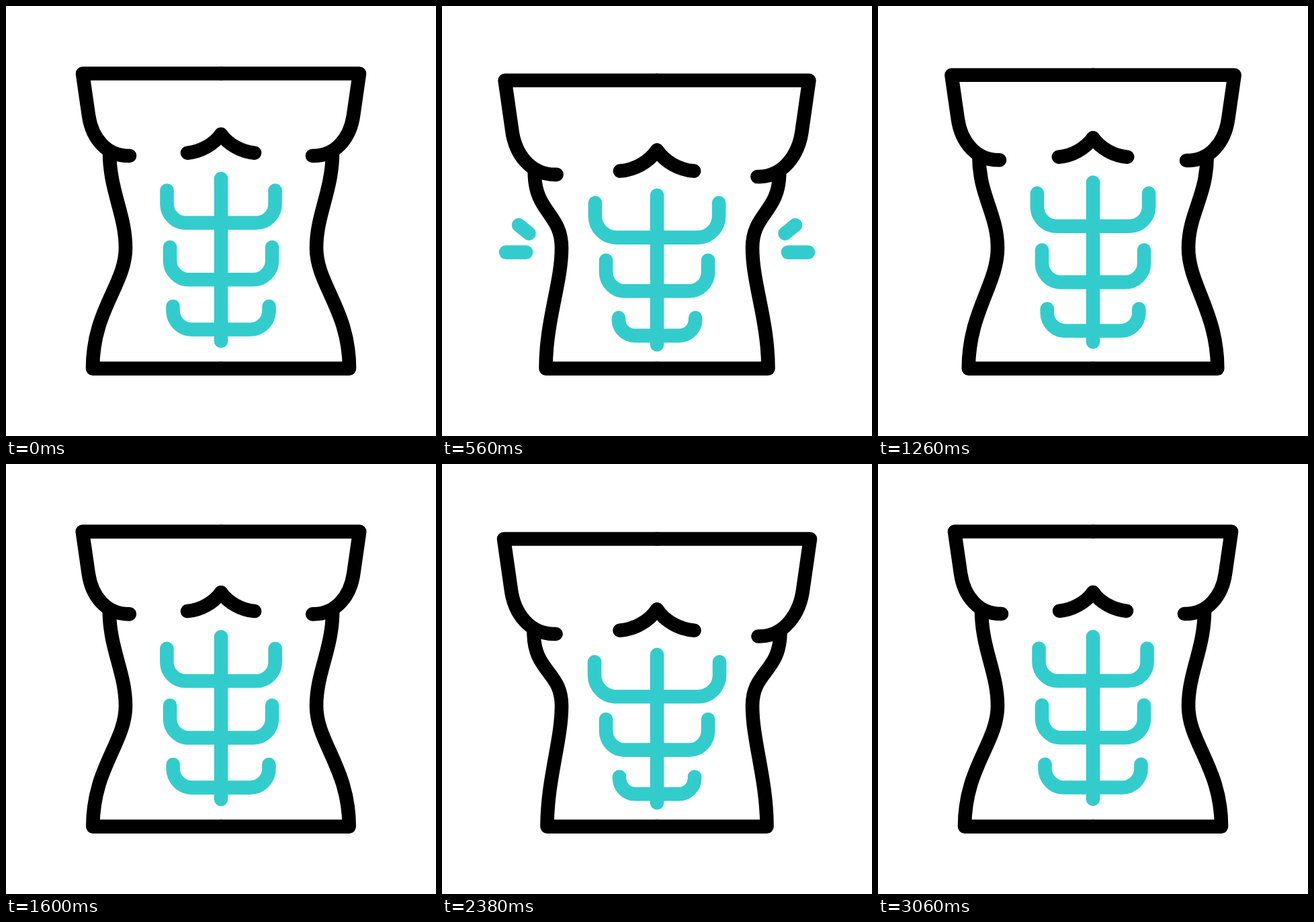
An HTML page for the animation above (3600 ms loop, 640 px wide and 640 px high).

```html
<!DOCTYPE html>
<html lang="en">
<head>
<meta charset="utf-8">
<title>Abs</title>
<style>
html, body { margin: 0; width: 100%; height: 100%; overflow: hidden; background: #fff; }
svg { display: block; width: 100%; height: 100%; }
path { fill: none; stroke-width: 20.6; stroke-linecap: round; stroke-linejoin: round; }
.ink { stroke: #000; }
.teal { stroke: #33cccc; }
</style>
</head>
<body>
<svg viewBox="0 0 640 640"></svg>
<script>
const LOOP = 3600, PERIOD = 1500, START = 60, MOVE = 690, RELAX = 810;
const svg = document.querySelector('svg');

const clamp = x => Math.min(1, Math.max(0, x));
const smooth = x => x * x * (3 - 2 * x);

// cubic-bezier(.333, 0, .35, 1), solved by bisection
function ease(x) {
  let lo = 0, hi = 1, s = 0.5;
  for (let i = 0; i < 24; i++) {
    s = (lo + hi) / 2;
    const u = 1 - s;
    if (u * u * s + 1.05 * u * s * s + s * s * s < x) lo = s; else hi = s;
  }
  return smooth(s);
}

function addPath(cls, mirrored) {
  const el = document.createElementNS('http://www.w3.org/2000/svg', 'path');
  el.setAttribute('class', cls);
  if (mirrored) el.setAttribute('transform', 'matrix(-1 0 0 1 640 0)');
  svg.append(el);
  return el;
}

// Blend two path strings that share the same commands
function blend(rest, flex, p) {
  const to = flex.match(/[\d.]+/g);
  let i = 0;
  return rest.replace(/[\d.]+/g, n => (+n + (to[i++] - n) * p).toFixed(2));
}

// Left half of one ab row: end x, end y, floor y, corner radius
function row(x, top, y, r) {
  const k = r * 0.45;
  return `M${x} ${top} L${x} ${y - r} C${x} ${y - k} ${x + k} ${y} ${x + r} ${y} L320 ${y}`;
}

const armL = ['M320 100.5 L114 100.5 L123 163 C128 197 150 224 184 223',
              'M320 111.5 L92 111.5 L102.5 185 C107 223 131 254 169.5 253'];
const armR = [armL[0],
              'M320 111.5 L92 111.5 L102.5 185 C107 223 131 257.5 169.5 256.5'];
const waist = ['M154 217 C154 275 178 310 178 360 C178 415 129 452 129 539.6 L320 539.6',
               'M136.5 250 C136.5 310 178 308 178 360 C178 412 156.5 470 156.5 539.6 L320 539.6'];
const chest = ['M270 218.7 C290 217 309 206 320 191',
               'M264.5 247.7 C287 246 308 234 320 216.5'];
const spine = ['M320 257 L320 498.8', 'M320 283.8 L320 504.3'];
const rows = [
  [row(239.5, 274.5, 322.8, 28), row(227, 294.5, 346.3, 32)],
  [row(244, 359, 407.3, 28), row(244, 380, 425.6, 28)],
  [row(248.5, 447, 481.5, 28), row(264, 465.5, 491.3, 23.5)]
];

const shapes = [];
function add(cls, pair, mirrored) {
  shapes.push({ el: addPath(cls, mirrored), pair });
}
add('ink', armL, false);
add('ink', armR, true);
for (const m of [false, true]) {
  add('ink', waist, m);
  add('ink', chest, m);
  for (const r of rows) add('teal', r, m);
}
add('teal', spine, false);

// Flex marks run from beside the waist outwards
const marks = [];
for (const m of [false, true])
  for (const line of [[134, 366.6, 90, 366.6], [134, 342.3, 111.5, 324]])
    marks.push({ el: addPath('teal', m), line });

function drawMarks(c) {
  const head = smooth(clamp((c - 272) / 290));
  const tail = smooth(clamp((c - 417) / 290));
  for (const { el, line: [x1, y1, x2, y2] } of marks) {
    const at = f => `${x1 + (x2 - x1) * f} ${y1 + (y2 - y1) * f}`;
    el.setAttribute('d', head > tail ? `M${at(tail)} L${at(head)}` : '');
  }
}

function draw(t) {
  const since = t - START;
  const c = since < 0 ? 0 : since < PERIOD ? since : since - PERIOD;
  // The second flex starts as the first one comes to rest
  const second = since >= PERIOD;
  const p = second || since < PERIOD
    ? ease(clamp(c / MOVE)) - ease(clamp((c - RELAX) / MOVE))
    : 0;
  for (const { el, pair } of shapes) el.setAttribute('d', blend(pair[0], pair[1], p));
  drawMarks(c);
}

const begin = performance.now();
function tick() {
  draw((performance.now() - begin) % LOOP);
  requestAnimationFrame(tick);
}
draw(0);
requestAnimationFrame(tick);
</script>
</body>
</html>
```
